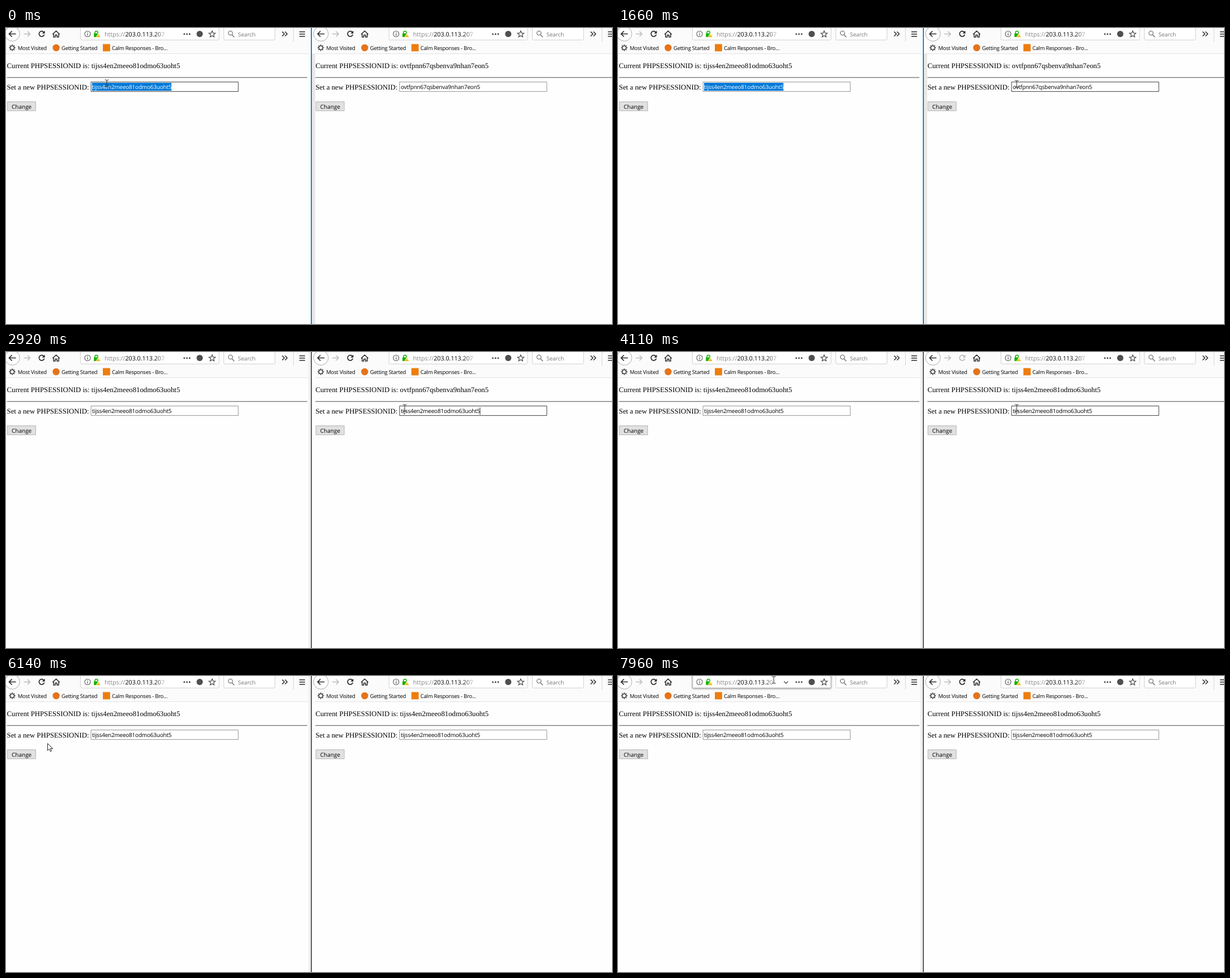
An HTML page with a canvas for the animation above (8 s loop, 1070 by 524 pixels).

```html
<!DOCTYPE html>
<html lang="en">
<head>
<meta charset="utf-8">
<title>Session change</title>
<style>
html, body { margin: 0; width: 100%; height: 100%; overflow: hidden; background: #fefefe; }
canvas { display: block; }
</style>
</head>
<body>
<canvas id="stage" width="1070" height="524"></canvas>
<script>
const c = document.getElementById('stage').getContext('2d');
// The desktop is shown at 80%, so hairlines are .8 px wide
const LOOP = 8000, RIGHT = 544.8, HAIR = .8;
const SERIF = '"Liberation Serif", serif', SANS = '"Open Sans", "Noto Sans", sans-serif';
const FIRST = 'tijss4en2meeo81odmo63uoht5', SECOND = 'ovtfpnn67qsbenva9nhan7eon5';
const INK = '#2b2b2e';

// Pointer poses, each held until the next: start time, shape, x, y
const POINTER = [
  [0, 'beam', 178, 98], [970, 'arrow', 350, 74], [1090, 'arrow', 576, 85],
  [1240, 'arrow', 640, 86], [1370, 'arrow', 677, 85], [1510, 'arrow', 693, 91],
  [1660, 'beam', 704, 99], [4260, 'arrow', 620, 140], [4380, 'arrow', 480, 147],
  [4500, 'arrow', 379, 135], [4650, 'beam', 269, 110], [4900, 'beam', 265, 110],
  [5050, 'beam', 258, 113], [5170, 'beam', 252, 113], [5570, 'beam', 247, 111],
  [5720, 'arrow', 221, 87], [6000, 'arrow', 163, 84], [6140, 'arrow', 73, 119],
  [6260, 'arrow', 50, 137], [6380, 'arrow', 40, 139], [6530, 'arrow', 38, 140],
  [7030, 'arrow', 55, 107], [7180, 'arrow', 210, 23], [7310, 'arrow', 290, 22],
  [7450, 'beam', 284, 8], [7690, 'beam', 281, 7], [7840, 'beam', 278, 7], [7960, 'beam', 275, 7]
];

function rect(x, y, w, h, color) {
  c.fillStyle = color;
  c.fillRect(x, y, w, h);
}
function box(x, y, w, h, fill, border, radius = 0) {
  c.beginPath();
  c.roundRect(x + HAIR / 2, y + HAIR / 2, w - HAIR, h - HAIR, radius);
  paint(fill, border, HAIR);
}
function disc(x, y, r, fill, border, width = 1) {
  c.beginPath();
  c.arc(x, y, r, 0, 7);
  paint(fill, border, width);
}
function paint(fill, border, width) {
  if (fill) { c.fillStyle = fill; c.fill(); }
  if (border) { c.strokeStyle = border; c.lineWidth = width; c.stroke(); }
}
function shape(path, fill, border, width = 1.5) {
  const p = new Path2D(path);
  if (fill) { c.fillStyle = fill; c.fill(p); }
  if (border) { c.strokeStyle = border; c.lineWidth = width; c.stroke(p); }
}
function text(s, x, y, size, family = SANS, color = '#000', spacing = 0) {
  c.font = `${size}px ${family}`;
  c.letterSpacing = spacing + 'px';
  c.fillStyle = color;
  c.fillText(s, x, y);
  return c.measureText(s).width;
}

function reloadIcon(state) {
  if (state === 'stop') return shape('M59 6.5l8 8M67 6.5l-8 8', null, INK, 1.7);
  const color = state === 'off' ? '#b9b9bb' : INK;
  shape('M66.8 7.4A4.7 4.7 0 1 0 67.6 11.6', null, color, 1.7);
  shape('M68.6 4.8v5h-5z', color);
}

function addressBar(open) {
  c.save();
  if (open) { c.shadowColor = '#0006'; c.shadowBlur = 3; c.shadowOffsetY = 1; }
  box(131, -4, 245.5, 25.6, '#fff', open ? '#b4b4b4' : '#c4c4c4', 2);
  c.restore();
  disc(144, 10.5, 5, null, '#5a5a5c', 1.1);
  rect(143.4, 9.8, 1.3, 3.6, '#5a5a5c');
  rect(143.4, 7.4, 1.3, 1.3, '#5a5a5c');
  shape('M157 10V8a2.6 2.6 0 0 1 5.2 0v2', null, '#14b307', 1.5);
  rect(155.2, 9.5, 7.6, 6.5, '#14b307');
  shape('M163 9.2l4.2 7.3h-8.4z', '#f5b800', '#fff', .7);
  rect(162.6, 11.5, .9, 2.6, '#fff');
  const w = text('https://', 174, 15, 10.7, SANS, '#858587');
  const fade = c.createLinearGradient(open ? 257 : 262, 0, open ? 280 : 285, 0);
  fade.addColorStop(0, '#000');
  fade.addColorStop(1, '#0000');
  text('203.0.113.207', 174 + w, 15, 10.7, SANS, fade);
  if (open) shape('M293 9.5l3.7 3.5 3.7-3.5', null, '#55555a', 1.4);
  for (const x of [314.8, 319.5, 324.2]) disc(x, 10.7, 1.5, '#4a4a4d');
  disc(342, 10.5, 5.5, '#4f4f52');
  let star = '';
  for (let i = 0; i < 10; i++) {
    const a = i * Math.PI / 5, r = i % 2 ? 2.7 : 6;
    star += `${i ? 'L' : 'M'}${364 + r * Math.sin(a)} ${11 - r * Math.cos(a)}`;
  }
  shape(star + 'z', null, '#4a4a4d', 1.2);
}

function toolbar(s) {
  rect(0, 0, 536, 45, '#fbfbfb');
  rect(0, 45, 536, HAIR, '#dcdcdc');
  disc(11.3, 10.3, 13, '#fff', '#ababab');
  shape('M17.5 10.5h-12M10.5 5.5l-5 5 5 5', null, INK, 1.7);
  shape('M31.5 10.5h11M38 6l4.5 4.5L38 15', null, '#bcbcbe', 1.5);
  reloadIcon(s.reload);
  shape('M82.2 11.2l6.3-6 6.3 6M84 10v6h3v-3.5h3V16h3v-6', null, INK, 1.5);
  addressBar(s.open);
  box(384.2, -4, 91.2, 25.6, '#fff', '#c4c4c4', 2);
  disc(396.3, 9, 3.7, null, '#77777a', 1.3);
  shape('M399 12l4.2 4.2', null, '#77777a', 1.6);
  text('Search', 409.5, 15, 9.9, SANS, '#77777a');
  shape('M487.5 6.5l4 4-4 4M492.5 6.5l4 4-4 4', null, INK, 1.5);
  rect(507, 0, 1, 24, '#d8d8d8');
  for (const y of [6, 10, 14]) rect(518, y, 10, 1.5, INK);

  if (s.bookmark) box(167.5, 26.8, 124.5, 16.2, '#dedede', '#dedede', 2);
  for (let i = 0; i < 8; i++) {
    const a = i * Math.PI / 4, x = Math.cos(a), y = Math.sin(a);
    shape(`M${11 + 3.5 * x} ${35 + 3.5 * y}L${11 + 5.7 * x} ${35 + 5.7 * y}`, null, '#3a3a3d', 1.5);
  }
  disc(11, 35, 3.4, null, '#3a3a3d', 1.4);
  disc(88.5, 35, 6.2, '#e3741c');
  rect(171, 28.5, 12.8, 12.8, '#ee7d0c');
  const label = (name, x) => text(name, x, 38.5, 9.5, SANS, '#000', -.25);
  label('Most Visited', 20.7);
  label('Getting Started', 98);
  label('Calm Responses - Bro...', 187);
}

function page(s) {
  text('Current PHPSESSIONID is: ' + s.current, 1.6, 71, 12.75, SERIF);
  rect(1.6, 86.9, 530.4, 1.4, '#7c7c7c');
  text('Set a new PHPSESSIONID:', 1.6, 108.5, 12.75, SERIF);
  box(149.7, 95.2, 260.8, 17.6, '#fff', s.hover ? '#111' : '#7a7a7a');
  const field = color => text(s.value, 152.1, 108.3, 10, SANS, color, -.22);
  const w = field('#000');
  if (s.selected) {
    rect(152, 97, w, 14, '#0078d7');
    field('#fff');
  }
  if (s.caret) rect(s.caret === 'end' ? 151.7 + w : 159, 98, HAIR, 13, '#000');
  box(2, 130.2, 50.8, 16.8, s.press ? '#e5f1fb' : '#e1e1e1', s.press ? '#0078d7' : '#a6a6a6');
  text('Change', 10, 143, 10);
}

function browser(x, s) {
  c.save();
  c.translate(x, 0);
  toolbar(s);
  page(s);
  c.restore();
}

function pointer(kind, x, y) {
  c.save();
  c.translate(x, y);
  if (kind === 'beam') shape('M-3.5 -6h2.5l1 1 1-1h2.5M0 -5V5M-3.5 6h2.5l1-1 1 1h2.5', null, '#333', 1);
  else shape('M.5 .5v12.5l3-2.8 2 4.5 2-.9-2-4.3h4z', '#fff', '#222', 1);
  c.restore();
}

function draw(t) {
  const during = (a, b) => t >= a && t < b;
  const switched = t >= 1970;
  rect(0, 0, 1070, 524, '#fefefe');
  browser(0, {
    current: FIRST, value: FIRST, selected: !switched,
    hover: t < 970 || during(4650, 5720),
    press: during(6260, 7180), bookmark: during(7180, 7310), open: t >= 7450
  });
  browser(RIGHT, {
    current: t < 3720 ? SECOND : FIRST,
    value: t < 2920 ? SECOND : FIRST,
    selected: during(2120, 2920),
    hover: during(1660, 4260),
    caret: during(1970, 2120) ? 'start' : during(2920, 3050) || during(3600, 3720) ? 'end' : '',
    reload: during(3600, 3870) ? 'stop' : during(3870, 4380) ? 'off' : ''
  });
  if (switched) rect(534, 0, 4.4, 524, '#efefef');
  else rect(540, 45, 6, 479, '#e8e8e8');
  rect(538.4, 0, 1.6, 524, switched ? '#3a3a3e' : '#0063b1');
  const pose = POINTER.findLast(p => p[0] <= t);
  pointer(...pose.slice(1));
}

c.textRendering = 'geometricPrecision';
const start = performance.now();
function tick() {
  draw((performance.now() - start) % LOOP);
  requestAnimationFrame(tick);
}
tick();
</script>
</body>
</html>
```
